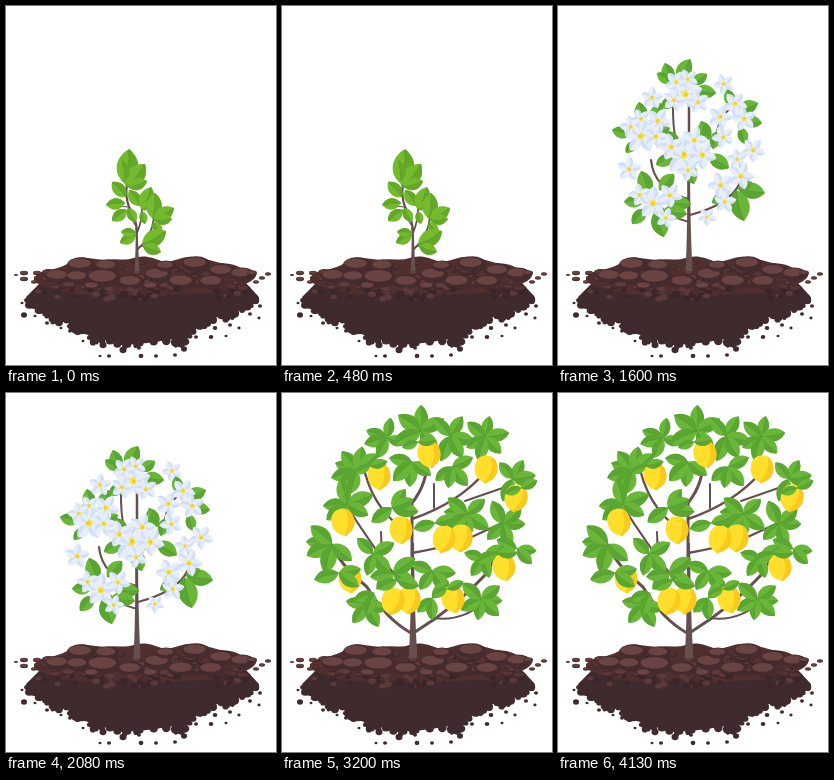
Write an HTML page that moves like this. It is 270 px wide and 359 px high and loops after 4.75 s.

```html
<!DOCTYPE html>
<html lang="en">
<head>
<meta charset="utf-8">
<title>Lemon tree growth</title>
<style>
  html, body { margin: 0; width: 100%; height: 100%; overflow: hidden; background: #fff; }
  svg { display: block; width: 100vw; height: 100vh; }
</style>
</head>
<body>
<svg id="scene" viewBox="0 0 270 359" fill="none" stroke-linecap="round" stroke-linejoin="round"></svg>
<script>
const NS = 'http://www.w3.org/2000/svg';
const scene = document.getElementById('scene');
const BARK = '#65504f';
const STARTS = [0, 800, 1600, 2400, 3200];
const TOTAL = 4750;

function rng(seed) {
  return () => {
    seed = (seed * 1664525 + 1013904223) >>> 0;
    return seed / 4294967296;
  };
}

function add(parent, tag, attrs) {
  const el = document.createElementNS(NS, tag);
  for (const k in attrs) el.setAttribute(k, attrs[k]);
  parent.appendChild(el);
  return el;
}
const path = (g, d, fill, extra) => add(g, 'path', { d, fill, ...extra });
const oval = (g, cx, cy, rx, ry, fill) => add(g, 'ellipse', { cx, cy, rx, ry, fill });
const place = (g, x, y, deg = 0, scale = 1) =>
  add(g, 'g', { transform: `translate(${x} ${y}) rotate(${deg}) scale(${scale})` });
const limb = (g, d, w) => path(g, d, 'none', { stroke: BARK, 'stroke-width': w });

// Soil
function smooth(pts) {
  let d = `M${pts[0]}`;
  for (let i = 1; i < pts.length - 1; i++) {
    const [a, b] = pts[i], [c, e] = pts[i + 1];
    d += `Q${a} ${b} ${(a + c) / 2} ${(b + e) / 2}`;
  }
  return d + `L${pts[pts.length - 1]}Z`;
}

function rock(g, x, y, r, base, light) {
  oval(g, x, y, r, r * 0.55, base);
  oval(g, x - r * 0.1, y - r * 0.13, r * 0.8, r * 0.34, light);
}

function soil(g) {
  const rand = rng(71);
  const rim = [[20, 291], [25, 302], [39, 307], [47, 316], [61, 316], [70, 325],
    [82, 329], [87, 337], [101, 334], [115, 339], [132, 338], [150, 336], [165, 333],
    [172, 341], [181, 333], [188, 324], [202, 317], [210, 311], [224, 313], [232, 305],
    [245, 301], [252, 290]];
  path(g, `M34 277L${rim.join('L')}L240 277Z`, '#3f2b2d');
  for (let i = 0; i < rim.length - 1; i++) {
    const [a, b] = rim[i], [c, d] = rim[i + 1];
    for (let k = 0; k < 3; k++) {
      const u = rand();
      oval(g, a + (c - a) * u, b + (d - b) * u + rand() * 2 - 1,
        2 + rand() * 2.6, 2 + rand() * 2.3, '#3f2b2d');
    }
  }
  const crumbs = [[18, 309, 3], [16, 297, 1.5], [41, 317, 2], [64, 325, 2], [97, 339, 3.5],
    [94, 350, 1.5], [103, 350, 2], [117, 344, 3.5], [133, 342, 2], [135, 350, 2.4],
    [150, 350, 2], [169, 349, 2], [178, 343, 3], [190, 331, 2], [205, 331, 2.3],
    [209, 322, 2.3], [220, 330, 1.5], [224, 319, 2], [233, 322, 1.6], [244, 308, 2],
    [253, 312, 1.6], [254, 300, 2], [55, 322, 1.5], [77, 335, 1.5], [29, 310, 1.5]];
  for (const [x, y, r] of crumbs) oval(g, x, y, r, r * 0.9, '#3f2b2d');

  path(g, smooth([[28, 271], [35, 265], [50, 263], [62, 258], [70, 251], [84, 252], [96, 254],
    [108, 253], [122, 254], [133, 250], [146, 251], [159, 257], [172, 253], [184, 250],
    [201, 253], [213, 257], [228, 258], [238, 264], [252, 266], [248, 274], [235, 280],
    [215, 287], [180, 287], [145, 291], [105, 287], [68, 289], [42, 282], [28, 276]]), '#50302f');
  for (let i = 0; i < 85; i++) {
    const x = 38 + rand() * 202;
    const top = 256 + Math.abs(x - 135) * 0.1;
    const y = top + rand() * (284 - top);
    const r = 3 + rand() * 6;
    rock(g, x, y, r, i % 3 ? '#472a2c' : '#3f282a', i % 2 ? '#603b3b' : '#563334');
  }
  const big = [[75, 259, 14], [101, 260, 12], [190, 258, 14], [216, 265, 13], [52, 270, 13],
    [72, 271, 12], [98, 272, 17], [152, 269, 14], [176, 276, 14], [206, 276, 13],
    [236, 268, 12], [125, 276, 13], [160, 260, 10], [86, 280, 8], [145, 280, 8]];
  for (const [x, y, r] of big) rock(g, x, y, r, '#452b2d', '#6a4343');
  for (let i = 0; i < 45; i++) {
    const r = 1 + rand() * 2.2;
    oval(g, 30 + rand() * 217, 282 + rand() * 11, r * 1.4, r, i % 3 ? '#3a2629' : '#5c393a');
  }
  for (const [x, y, r] of [[10, 269, 2], [18, 267, 4], [18, 273, 4], [31, 267, 4],
    [28, 276, 3], [246, 267, 5], [262, 268, 3], [256, 272, 3], [250, 276, 3]])
    rock(g, x, y, r, '#4a2e2f', '#6a4343');
}

// Plant parts
function leaf(g, x, y, deg, len, wide = 0.34, tones = ['#69b638', '#5ba532']) {
  const p = place(g, x, y, deg, len / 100);
  const w = wide * 100;
  path(p, `M0 0C25 ${-w} 70 ${-w * 1.1} 100 0C70 ${w * 1.1} 25 ${w} 0 0Z`, tones[0]);
  path(p, `M0 0Q50 8 100 0C70 ${w * 1.1} 25 ${w} 0 0Z`, tones[1]);
  path(p, 'M0 0Q50 8 96 0', 'none', { stroke: '#4e982f', 'stroke-width': 2.5 });
}

function leafTo(g, [x, y, tx, ty], wide, tones) {
  leaf(g, x, y, Math.atan2(ty - y, tx - x) * 180 / Math.PI, Math.hypot(tx - x, ty - y), wide, tones);
}

// Each whorl: x, y, leaf length, then leaf angles
function whorls(g, list) {
  list.forEach(([x, y, len, ...angles]) => angles.forEach((a, i) =>
    leaf(g, x, y, a, len * (1 + (i % 3 - 1) * 0.07))));
}

function budWhorl(g, x, y, turn, size) {
  for (let i = 0; i < 8; i++)
    leaf(g, x, y, turn + i * 45 + 20, size * 0.82, 0.28, ['#7cbb43', '#67a936']);
  for (let i = 0; i < 7; i++) {
    const a = (turn + i * 51.4) * Math.PI / 180;
    const r = size * (0.68 + (i % 3) * 0.08);
    const p = place(g, x + Math.cos(a) * r, y + Math.sin(a) * r, turn + i * 51.4);
    path(p, 'M-6 0L3 0', 'none', { stroke: '#8cc63f', 'stroke-width': 2 });
    path(p, 'M-5 0C-3-6 4-6 8 0C4 6-3 6-5 0Z', '#dcec69');
    path(p, 'M-5 0Q2 2 8 0C4 6-3 6-5 0Z', '#bcd936');
  }
}

function flower(g, x, y, r, turn) {
  const p = place(g, x, y, turn, r / 16);
  for (let i = 0; i < 5; i++) {
    const q = place(p, 0, 0, i * 72);
    path(q, 'M0 0C3-7 12-8 17 0C12 7 4 6 0 0Z', '#e6edfb');
    path(q, 'M1 0Q9 2 17 0C12 7 4 6 1 0Z', '#d2def5');
  }
  oval(p, 0, 0, 3.4, 3.4, '#f6e64b');
  oval(p, 0.6, 0.7, 1.8, 1.8, '#eccc2b');
}

function fruit(g, x, y, size, tilt, tones) {
  const p = place(g, x, y, tilt, size);
  path(p, 'M0-13C8-13 11-6 11 0C11 7 6 11 3 12Q1 15-1 13C-8 11-11 5-11-1C-11-8-7-13 0-13Z', tones[0]);
  path(p, 'M4-12C9-10 11-5 11 0C11 7 6 11 3 12Q1 15-1 13C5 6 7-3 4-12Z', tones[1]);
}

function trunk(g, top, w, lean = 0) {
  path(g, `M${131 - w} 265Q${132 - w * 0.6} 225 ${129 + lean} ${top}H${132 + lean}Q${130 + w * 0.6} 225 ${131 + w} 265Z`, BARK);
}

// Growth stages
function sapling(g) {
  trunk(g, 222, 2.4);
  limb(g, 'M131 226Q130 210 123 201Q119 190 121 178', 2.2);
  limb(g, 'M131 227Q136 215 136 202', 1.8);
  limb(g, 'M132 243Q146 230 148 212', 2);
  limb(g, 'M122 201L113 200M130 229L121 227M133 241L143 239M131 222L125 212', 1.2);
  const tones = ['#75ba2d', '#62a829'];
  [[120, 179, 123, 143], [121, 181, 139, 158], [122, 181, 141, 175], [119, 175, 116, 154],
   [120, 191, 106, 176], [119, 197, 100, 199], [121, 204, 106, 215], [122, 202, 130, 216],
   [134, 200, 123, 184], [136, 204, 145, 181], [137, 204, 146, 195], [136, 205, 139, 218],
   [147, 213, 149, 187], [148, 213, 168, 202], [148, 214, 166, 213], [147, 216, 156, 228],
   [130, 229, 114, 237], [130, 227, 115, 226], [136, 239, 160, 225], [137, 240, 155, 246]]
    .forEach(l => leafTo(g, l, 0.38, tones));
}

function budding(g) {
  trunk(g, 228, 2.7, -2);
  limb(g, 'M129 237Q123 214 123 198Q126 188 131 181L137 153', 3);
  limb(g, 'M123 199Q120 190 105 180', 2);
  limb(g, 'M129 245Q107 240 104 222', 2);
  limb(g, 'M132 244Q149 231 151 206', 2);
  limb(g, 'M133 242L144 236', 1.4);
  [[132, 179, 147, 183], [134, 171, 145, 179], [140, 236, 158, 237], [140, 235, 157, 243]]
    .forEach(l => leafTo(g, l, 0.4));
  [[139, 147, -62, 25], [103, 177, -90, 23], [152, 202, -92, 23], [102, 221, -93, 23]]
    .forEach(b => budWhorl(g, ...b));
}

function blossom(g) {
  trunk(g, 155, 3.6);
  limb(g, 'M131 160L131 92', 2.5);
  limb(g, 'M131 193Q96 184 93 154', 2.2);
  limb(g, 'M131 216Q111 211 103 201', 2);
  limb(g, 'M132 209Q171 199 182 177L183 148', 2.2);
  limb(g, 'M131 164Q114 145 115 97', 2);
  limb(g, 'M132 161Q158 143 162 112L177 98', 2);
  [[113, 78, 107, 57], [120, 75, 132, 53], [113, 77, 99, 67], [134, 78, 149, 68],
   [136, 84, 158, 87], [119, 91, 103, 102], [94, 116, 103, 97], [85, 117, 81, 96],
   [73, 129, 54, 124], [78, 135, 68, 147], [94, 128, 112, 122], [151, 134, 143, 115],
   [139, 136, 147, 117], [151, 149, 171, 162], [116, 150, 98, 159], [128, 155, 136, 178],
   [120, 141, 109, 125], [174, 101, 169, 83], [179, 105, 200, 97], [184, 114, 204, 117],
   [183, 121, 187, 138], [160, 125, 155, 143], [180, 182, 207, 187], [178, 184, 186, 215],
   [180, 183, 194, 176], [171, 188, 154, 197], [91, 189, 83, 165], [86, 195, 66, 196],
   [88, 203, 74, 218], [98, 204, 106, 231], [108, 196, 133, 198], [105, 204, 129, 208],
   [101, 184, 116, 168]].forEach(l => leafTo(g, l, 0.38));
  [[127, 88, 17], [118, 76, 11], [140, 96, 11], [116, 94, 11], [130, 73, 10],
   [83, 130, 17], [100, 115, 13], [73, 121, 11], [98, 131, 12], [83, 113, 10],
   [125, 149, 19], [144, 149, 14], [113, 141, 13], [136, 134, 13], [130, 164, 11],
   [95, 197, 16], [112, 189, 12], [82, 189, 11], [108, 212, 10],
   [166, 78, 10], [94, 92, 11], [177, 98, 12], [186, 113, 12], [162, 111, 12],
   [165, 131, 11], [71, 163, 12], [195, 144, 12], [179, 153, 10], [183, 170, 13],
   [163, 179, 13], [167, 196, 11], [149, 211, 9]]
    .forEach(([x, y, r], i) => flower(g, x, y, r, i * 29 - 18));
}

function greenFruit(g) {
  trunk(g, 175, 3.8, -3);
  limb(g, 'M127 190Q122 155 128 121L131 68', 3);
  limb(g, 'M129 231Q91 214 88 182L85 145', 3);
  limb(g, 'M132 221Q178 203 185 150', 3);
  limb(g, 'M125 144Q87 133 83 93', 2.4);
  limb(g, 'M127 119Q155 105 155 76', 2.4);
  limb(g, 'M127 194Q146 178 158 168', 2);
  limb(g, 'M91 195Q73 187 65 174M145 105L142 84M160 206L153 188M184 168L200 151', 1.8);
  whorls(g, [
    [104, 63, 22, -80, -135, 175, 138, -28], [132, 56, 25, -80, 165, 40],
    [82, 88, 22, -90, -155, 155, 105, 37], [155, 76, 25, -82, -20, 115, 50, -140],
    [180, 105, 27, -15, -70, 50, 145, -150], [71, 132, 27, 175, 137, -105, 8, 45, -48],
    [121, 133, 25, 155, 120, -15, 48, -115], [178, 136, 27, -165, 130, -48, 78, -100],
    [202, 138, 30, -9, 150], [65, 171, 28, 157, -155, -18, 42],
    [124, 174, 26, -160, 120, 25, -40, -110], [160, 171, 24, 155, 70, -135, 10],
    [187, 169, 25, 45, 108]
  ]);
  whorls(g, [[91, 200, 26, 157, -165, 127, -30, 20], [134, 193, 22, 80, 145],
    [166, 202, 26, 152, -125, 15, -43]]);
  const tones = ['#c2e33f', '#addb2c'];
  [[133, 88], [102, 109], [180, 114], [69, 155], [107, 161], [141, 154],
   [157, 155], [206, 151], [93, 217], [169, 211]]
    .forEach(([x, y], i) => fruit(g, x, y, 0.8, i % 3 * 7 - 9, tones));
  whorls(g, [[121, 133, 22, 176, 7], [177, 112, 21, -150, -55], [160, 147, 20, -110, 105],
    [84, 206, 18, 160, -70], [164, 196, 18, -35, 175]]);
}

function ripeFruit(g) {
  trunk(g, 150, 4.4);
  limb(g, 'M130 170L130 110Q146 90 145 65', 3);
  limb(g, 'M129 240Q104 226 85 194Q59 173 47 149', 3);
  limb(g, 'M133 239Q175 213 205 180L222 148', 3);
  limb(g, 'M130 160Q171 153 194 142L222 129', 2.4);
  limb(g, 'M130 126Q177 110 204 78', 2.4);
  limb(g, 'M130 142Q94 121 83 80', 2.4);
  limb(g, 'M112 181Q89 151 66 115', 2.2);
  limb(g, 'M152 225Q180 229 202 209M152 115L152 91M183 108L232 91M100 168L99 139', 2);
  whorls(g, [
    [105, 45, 22, -80, -160, 165, 15, 115], [139, 38, 28, -90, -145, 155, -28, 55],
    [168, 43, 25, -58, 12, 110, -130, 60], [203, 44, 23, -78, -140, -10, 150, 45, 105],
    [75, 78, 25, -160, -128, 165, 138, -78, -40, 105], [130, 69, 25, -170, 95, 135, 35],
    [170, 74, 23, 140, -25, 50, 100], [231, 86, 23, -62, 7, 115, -130, -10],
    [65, 111, 26, 175, 142, -20, 28, -105, 115], [50, 151, 28, -175, 155, 103, 40, -140]
  ]);
  whorls(g, [
    [110, 115, 25, -55, 145, 8, -22], [185, 121, 25, -175, -140, 35, -40, 90, 138],
    [221, 131, 24, 0, -40, -115, 135, 72], [235, 156, 21, 5, 45, -155],
    [91, 161, 24, -135, -28, 48, 105], [111, 180, 25, 135, 25, -35, 170],
    [150, 178, 24, -160, 5, 50, 122], [202, 165, 22, -165, 125, -32, 75],
    [85, 212, 23, -170, 128, 62, 10], [150, 205, 22, 135, 90, -45],
    [199, 206, 23, 5, -35, 43, 98, 150, -140]
  ]);
  const tones = ['#ffdf2b', '#f9c91b'];
  [[147, 61], [97, 83], [204, 76], [234, 105], [61, 129], [119, 137], [179, 145],
   [162, 146], [222, 174], [68, 186], [127, 207], [111, 208], [171, 206]]
    .forEach(([x, y], i) => fruit(g, x, y, 1.04, i % 4 * 8 - 10, tones));
  whorls(g, [[136, 49, 18, 160, -5], [88, 73, 18, 155, -15], [239, 95, 18, 160, -25],
    [57, 180, 24, -10, 35, 165], [115, 187, 23, 155, 15], [215, 160, 22, 0, 155],
    [165, 196, 18, 155, -25], [153, 130, 22, -15, 165], [92, 200, 23, 160, 110]]);
}

soil(add(scene, 'g', {}));
[sapling, budding, blossom, greenFruit, ripeFruit].forEach((draw, i) => {
  const g = add(scene, 'g', { opacity: 0 });
  draw(g);
  const steps = [...STARTS, TOTAL].map((t, j) =>
    ({ offset: t / TOTAL, opacity: Number(i === j % STARTS.length), easing: 'step-end' }));
  g.animate(steps, { duration: TOTAL, iterations: Infinity }).startTime = 0;
});
</script>
</body>
</html>
```
